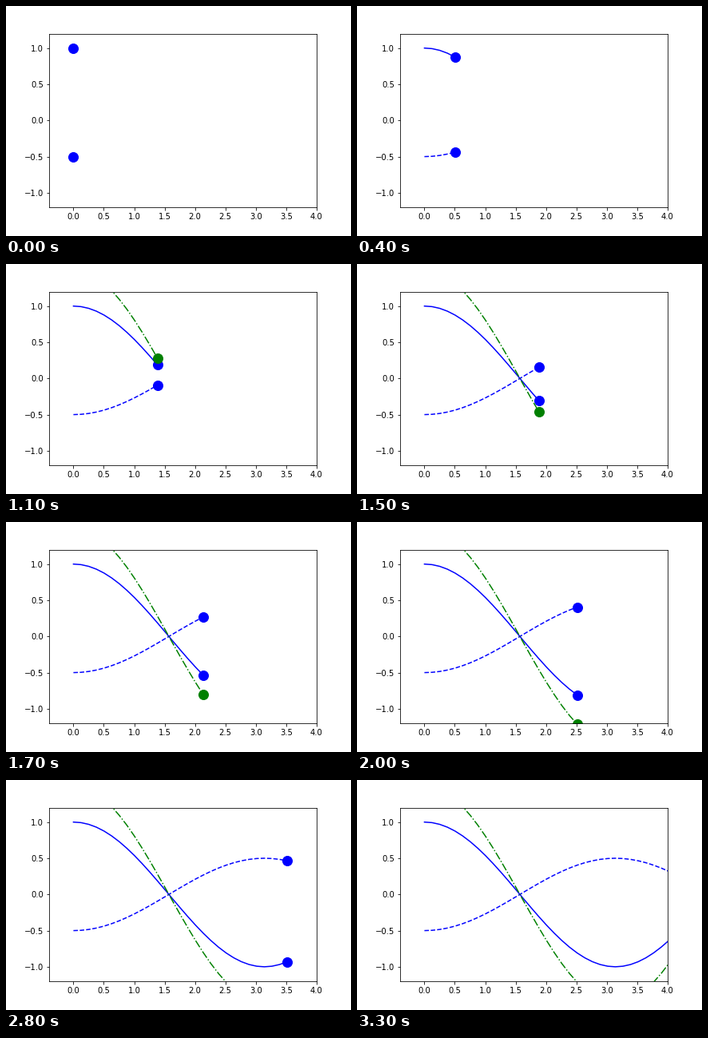
These frames come from a looping animation (432x288 px, 5.1 s). A matplotlib script:

```python
import numpy as np
import matplotlib.pyplot as plt
from matplotlib.animation import FuncAnimation

FRAMES = 51
INTERVAL = 100

x = np.linspace(0, 2 * np.pi, FRAMES)
# amplitude, line style, colour
WAVES = [(1.0, "-", "b"), (-0.5, "--", "b"), (1.5, "-.", "g")]

fig, ax = plt.subplots(figsize=(6, 4), dpi=72)
fig.subplots_adjust(left=0.125, right=0.9, bottom=0.125, top=0.88)
ax.set_xlim(-0.4, 4.0)
ax.set_ylim(-1.2, 1.2)

curves = []
for amp, style, color in WAVES:
    line, = ax.plot([], [], style, color=color, lw=1.5)
    dot, = ax.plot([], [], "o", color=color, ms=12)
    curves.append((amp * np.cos(x), line, dot))


def draw(i):
    artists = []
    for y, line, dot in curves:
        line.set_data(x[:i + 1], y[:i + 1])
        dot.set_data(x[i:i + 1], y[i:i + 1])
        artists += [line, dot]
    return artists


def reset():
    return draw(0)


anim = FuncAnimation(fig, draw, frames=FRAMES, init_func=reset,
                     interval=INTERVAL, repeat=True, repeat_delay=0)
plt.show()
```
